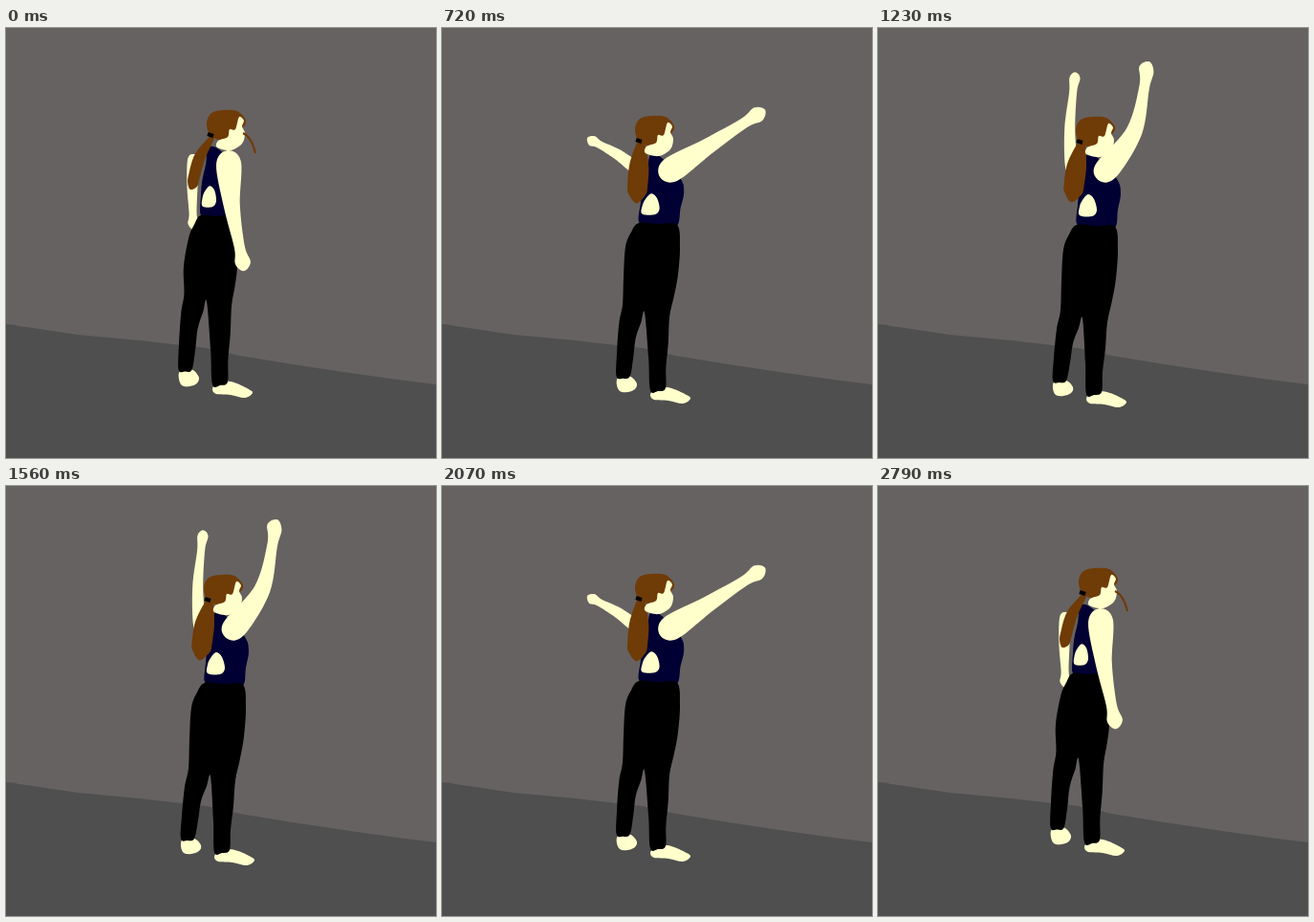
An HTML page for the animation above (2.82 s loop, 450 by 450 pixels).

```html
<!DOCTYPE html>
<html lang="en">
<head>
<meta charset="utf-8">
<title>Arm raise</title>
<style>
html, body { margin: 0; width: 100%; height: 100%; overflow: hidden; background: #666261; }
svg { display: block; width: 100%; height: 100%; }
</style>
</head>
<body>
<svg id="stage" viewBox="0 0 450 450">
  <rect width="450" height="450" fill="#666261"/>
  <path fill="#4f4f4f" d="M0 310 Q8 310 14 312 L35 315 75 321 140 327 210 335 245 343 300 352 360 361 410 368 450 373 V450 H0Z"/>
</svg>
<script>
const STEP = 30, FRAMES = 94;
const SKIN = '#ffffcc', HAIR = '#6f3b07', NAVY = '#000033', BLACK = '#000';

// The body is outlined once, arms raised; every other pose bends these shapes.
const shapes = {
  leftFoot: '185 370 197 369 204 376 202 382 194 385 186 384 183 377',
  rightFoot: '222 383 232 380 243 382 256 388 260 392 252 397 237 394 222 393 218 388',
  top: '218 133 230 136 250 158 254 173 251 190 248 209 232 208 219 207 208 205 209 185 211 168 215 150',
  pants: '208 206 228 207 248 208 251 232 249 262 245 285 240 308 238 335 235 360 234 381 226 384 218 383 217 350 214 304 210 314 204 330 201 350 197 369 190 371 183 369 184 345 187 315 191 295 192 265 194 232 200 216',
  gap: '214 180 220 174 226 179 229 191 224 197 211 196 211 187',
  cap: '224 93 239 94 248 104 243 113 230 121 220 124 210 118 207 106 212 96',
  face: '241 100 246 104 244 110 247 117 244 128 232 135 218 132 219 125 229 121 231 113 237 113'
};

// Heights of chest, waist, crotch and feet, which shift independently.
const LEVELS = [150, 207, 304, 385];

// time, then x y shifts of head, chest, waist, crotch, feet, then waist pinch
const poses = [
  [0, 3, -7, -6, -8, -10, -10, -4, -18, -2, -10, 0.28],
  [360, -1, -2, -2, 1, -7, -7, -4, -6, -2, -4, 0.22],
  [720, -5, -1, 0, 0, -2, -2, -2, -6, 0, -4, 0],
  [1230, 0, 0, 0, 0, 0, 0, 0, 0, 0, 0, 0],
  [1395, 1, 2, 1, 2, 1, 2, 1, 2, 1, 2, 0]
];

// Limbs: root point, radii from root to end, keys of time, end x y, bend, girth
const limbs = {
  front: { root: [239, 149], radii: [13, 8.5, 5.5, 8], keys: [
    [0, 248, 246, 3, 1], [360, 248, 256, 4, 1], [540, 305, 225, 2, 1], [630, 332, 150, 0, 1],
    [720, 331, 90, 0, 1], [990, 292, 40, 8, 1], [1230, 281, 43, 12, 1], [1395, 311, 58, 8, 1]] },
  back: { root: [202, 146], radii: [6, 5.5, 4, 5.5], keys: [
    [0, 196, 205, 1, 1], [360, 199, 212, 1, 1], [540, 151, 180, 1, 1], [630, 142, 146, 1, 1],
    [720, 157, 118, 2, 1], [990, 188, 60, 0, 1], [1230, 206, 52, -3, 1], [1395, 167, 83, 0, 1]] },
  tail: { root: [213, 121], onHead: true, radii: [4, 10, 10.5, 9], keys: [
    [0, 195, 164, 4, 0.58], [360, 201, 172, 3, 0.7], [720, 204, 174, 0, 1], [1230, 204, 173, 1, 1]] }
};
const JOINTS = [0, 0.43, 0.84, 1], BENDS = [0, 1, 0.4, 0];

// Cubic interpolation through rows that begin with a time; holds the last row.
function sample(rows, t) {
  const last = rows.length - 1;
  if (t >= rows[last][0]) return rows[last].slice(1);
  const i = rows.findIndex((r, k) => k < last && t < rows[k + 1][0]);
  const span = rows[i + 1][0] - rows[i][0], u = (t - rows[i][0]) / span;
  const slope = (k, n) => {
    const a = rows[Math.max(k - 1, 0)], b = rows[Math.min(k + 1, last)];
    return (b[n] - a[n]) / (b[0] - a[0]) * span;
  };
  return rows[i].map((p, n) => {
    const q = rows[i + 1][n], m = slope(i, n), w = slope(i + 1, n);
    return p + u * (m + u * (3 * (q - p) - 2 * m - w + u * (2 * (p - q) + m + w)));
  }).slice(1);
}

const moveHead = ([x, y], pose) => [x + pose[0], y + pose[1]];

function moveBody([x, y], pose) {
  const h = Math.min(Math.max(y, LEVELS[0]), LEVELS[3]);
  const i = h < LEVELS[1] ? 0 : h < LEVELS[2] ? 1 : 2;
  const u = (h - LEVELS[i]) / (LEVELS[i + 1] - LEVELS[i]);
  const shift = k => pose[2 + 2 * i + k] * (1 - u) + pose[4 + 2 * i + k] * u;
  const pinch = pose[10] * Math.max(0, 1 - Math.abs(y - LEVELS[1]) / 60);
  return [x + (228 - x) * pinch + shift(0), y + shift(1)];
}

// Smooth closed path through points.
function curve(points) {
  const n = points.length, pt = i => points[(i + n) % n], f = v => v.toFixed(2);
  let d = 'M' + pt(0).map(f);
  for (let i = 0; i < n; i++) {
    const [a, b, c, e] = [pt(i - 1), pt(i), pt(i + 1), pt(i + 2)];
    d += 'C' + [0, 1].map(k => f(b[k] + (c[k] - a[k]) / 6)) + ' ' +
      [0, 1].map(k => f(c[k] - (e[k] - b[k]) / 6)) + ' ' + c.map(f);
  }
  return d + 'Z';
}

const rootAt = (limb, pose) => (limb.onHead ? moveHead : moveBody)(limb.root, pose);

// Tapered limb: a bent spine, offset to both sides, with a round cap at each end.
function limbPath(limb, pose, t) {
  const [x, y] = rootAt(limb, pose), [angle, len, bend, girth] = sample(limb.swing, t);
  const c = Math.cos(angle), s = Math.sin(angle);
  const place = (u, v) => [x + u * c - v * s, y + u * s + v * c];
  const r = limb.radii.map(v => v * girth);
  const side = sign => JOINTS.map((j, i) => place(j * len, BENDS[i] * bend + sign * r[i]));
  return curve([place(-r[0], 0), ...side(-1), place(len + r[3] * 1.05, 0), ...side(1).reverse()]);
}

// Turn end points into angle and length, so that limbs swing in arcs.
for (const limb of Object.values(limbs)) {
  limb.swing = limb.keys.map(([t, ex, ey, bend, girth]) => {
    const [x, y] = rootAt(limb, sample(poses, t));
    let angle = Math.atan2(ey - y, ex - x);
    if (limb === limbs.back && angle < 0) angle += 2 * Math.PI;
    return [t, angle, Math.hypot(ex - x, ey - y), bend, girth];
  });
}

const stage = document.getElementById('stage'), layers = [];
function layer(path, fill, line, width) {
  const el = document.createElementNS('http://www.w3.org/2000/svg', 'path');
  el.setAttribute('fill', fill);
  if (line) {
    el.setAttribute('stroke', line);
    el.setAttribute('stroke-width', width);
  }
  stage.append(el);
  layers.push({ el, path });
}

function shape(name, fill, move = moveBody) {
  const xy = shapes[name].split(' ').map(Number);
  const points = xy.flatMap((v, i) => i % 2 ? [] : [[v, xy[i + 1]]]);
  layer(pose => curve(points.map(p => move(p, pose))), fill);
}
const limb = (name, fill) => layer((pose, t) => limbPath(limbs[name], pose, t), fill);

// A loose strand that is gone once the head is up.
function strand(pose, t) {
  const k = Math.max(0, 1 - t / 300);
  return `M${moveHead([245, 117], pose)}q${9 * k} ${4 * k} ${13 * k} ${21 * k}`;
}
function hairTie(pose) {
  const [x, y] = moveHead(limbs.tail.root, pose);
  return `M${x - 5} ${y - 3}l6 2`;
}

limb('back', SKIN);
shape('leftFoot', SKIN);
shape('rightFoot', SKIN);
shape('top', NAVY);
shape('pants', BLACK);
shape('gap', SKIN);
limb('tail', HAIR);
shape('cap', HAIR, moveHead);
layer(hairTie, 'none', BLACK, 4);
shape('face', SKIN, moveHead);
layer(strand, 'none', HAIR, 2);
limb('front', SKIN);

function draw(t) {
  const pose = sample(poses, t);
  for (const { el, path } of layers) el.setAttribute('d', path(pose, t));
}

// The second half of the loop plays the first half backwards.
const start = performance.now();
function tick(now) {
  const i = Math.floor(Math.max(0, now - start) / STEP) % FRAMES;
  draw(Math.min(i, FRAMES - 1 - i) * STEP);
  requestAnimationFrame(tick);
}
draw(0);
requestAnimationFrame(tick);
</script>
</body>
</html>
```
